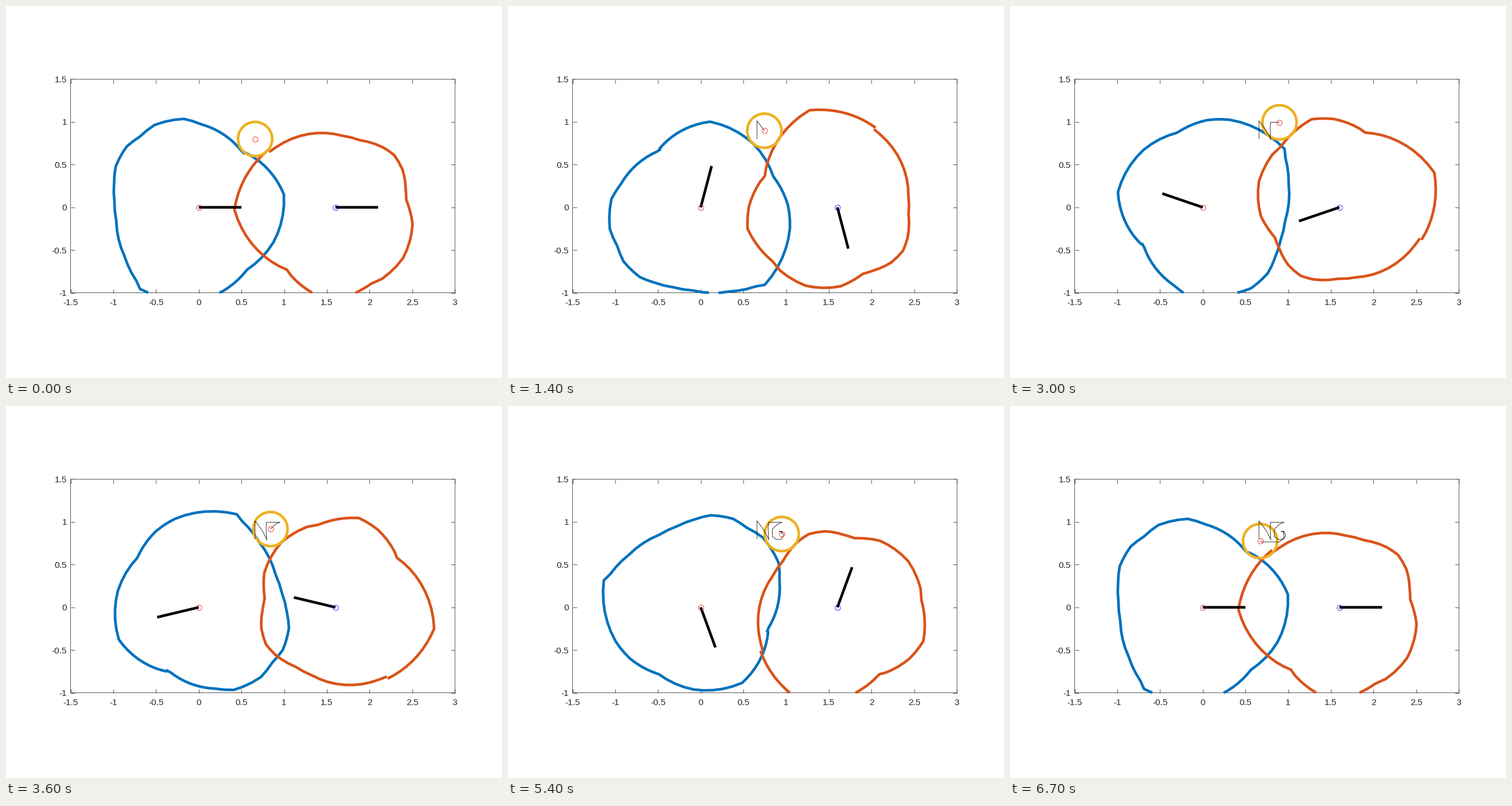
Write a matplotlib script that moves like this. It is 864 px wide and 648 px high and loops after 6.8 s.

```python
import numpy as np
import matplotlib.pyplot as plt
from matplotlib.animation import FuncAnimation

plt.rcParams.update({"font.family": "Liberation Sans", "path.snap": False})

W, H = 864, 648
STEPS = 68
ROLLER = 0.2
ARM = 0.5
PIVOTS = np.array([[0, 0], [1.6, 0]])
SPIN = (1, -1)
BLUE, ORANGE, YELLOW = (0, .447, .741), (.85, .325, .098), (.929, .694, .125)
PX = W / 560        # one drawing point in pixels
THICK, THIN = 3 * PX, 0.5 * PX
INK = (.15, .15, .15)

# Turning points of the pen that writes "NG": (step, x, y)
keys = [
    (0, .660, .800), (9, .659, 1.013), (14, .745, .897), (18, .799, .790),
    (19, .792, .820), (23, .789, .932), (26, .793, .995), (32, .952, .995),
    (33, .903, .976), (36, .840, .916), (40, .838, .828), (42, .882, .796),
    (44, .940, .796), (46, .971, .840), (49, .952, .891), (51, .917, .889),
    (53, .947, .882), (56, .952, .810), (58, .893, .765), (66, .690, .765),
    (67, .672, .776),
]


def follow(t, times, points):
    """Positions at times t along straight moves between the given points."""
    return np.column_stack([np.interp(t, times, c) for c in points.T])


def polar(r, a):
    return np.column_stack([r * np.cos(a), r * np.sin(a)])


step = np.arange(STEPS)
theta = np.linspace(0, 2 * np.pi, STEPS)
keys = np.array(keys)
pen = follow(step, keys[:, 0], keys[:, 1:])


def cam_profile(pivot, spin):
    """Cam outline at rest: the pen path seen from the turning cam."""
    d = pen - pivot
    r = np.hypot(*d.T) - ROLLER
    pts = polar(r, np.arctan2(d[:, 1], d[:, 0]) - spin * theta)
    # dense points, so the outline can be cut at the lower axis
    return follow(np.linspace(0, STEPS - 1, (STEPS - 1) * 40 + 1), step, pts)


def turn(pts, a):
    c, s = np.cos(a), np.sin(a)
    return pts @ np.array([[c, s], [-s, c]])


fig = plt.figure(figsize=(W / 72, H / 72), dpi=72, facecolor="white")
ax = fig.add_axes([112.5 / W, 148.5 / H, 669.6 / W, 372 / H])
ax.set(xlim=(-1.5, 3), ylim=(-1, 1.5))
for axis, ticks in ((ax.xaxis, np.arange(-1.5, 3.1, .5)),
                    (ax.yaxis, np.arange(-1, 1.6, .5))):
    axis.set_ticks(ticks, [f"{t:g}" for t in ticks])
ax.tick_params(direction="in", top=True, right=True, length=6.7, width=THIN,
               color=INK, labelcolor=INK, labelsize=10 * PX)
ax.tick_params(axis="x", pad=10.5)
ax.tick_params(axis="y", pad=6.5)
for spine in ax.spines.values():
    spine.set(linewidth=THIN, color=INK)


def line(color, width, z):
    return ax.plot([], [], color=color, lw=width, zorder=z, clip_on=False,
                   solid_capstyle="butt", solid_joinstyle="round")[0]


def ring(pos, color):
    return ax.plot(*[[v] for v in pos], "o", ms=6 * PX, mfc="none", mec=color,
                   mew=THIN, zorder=8)[0]


profiles = [cam_profile(p, s) for p, s in zip(PIVOTS, SPIN)]
cams = [line(BLUE, THICK, 3), line(ORANGE, THICK, 4)]
roller = line(YELLOW, THICK, 5)
arms = [line("black", THICK, 6) for _ in PIVOTS]
trail = line("black", THIN, 7)
ring(PIVOTS[0], "red")
ring(PIVOTS[1], "blue")
center = ring(pen[0], "red")
rim = polar(ROLLER, np.linspace(0, 2 * np.pi, 100))


def update(i):
    for cam, arm, prof, pivot, spin in zip(cams, arms, profiles, PIVOTS, SPIN):
        a = spin * theta[i]
        pts = turn(prof, a) + pivot
        pts[pts[:, 1] < -1] = np.nan
        cam.set_data(*pts.T)
        # both arms start pointing right
        tip = pivot + ARM * np.array([np.cos(a), np.sin(a)])
        arm.set_data(*np.array([pivot, tip]).T)
    roller.set_data(*(rim + pen[i]).T)
    center.set_data(*pen[i:i + 1].T)
    trail.set_data(*pen[:i + 1].T)
    return [*cams, *arms, roller, center, trail]


anim = FuncAnimation(fig, update, frames=STEPS, interval=100, repeat=True,
                     repeat_delay=0, init_func=lambda: update(0))
plt.show()
```
